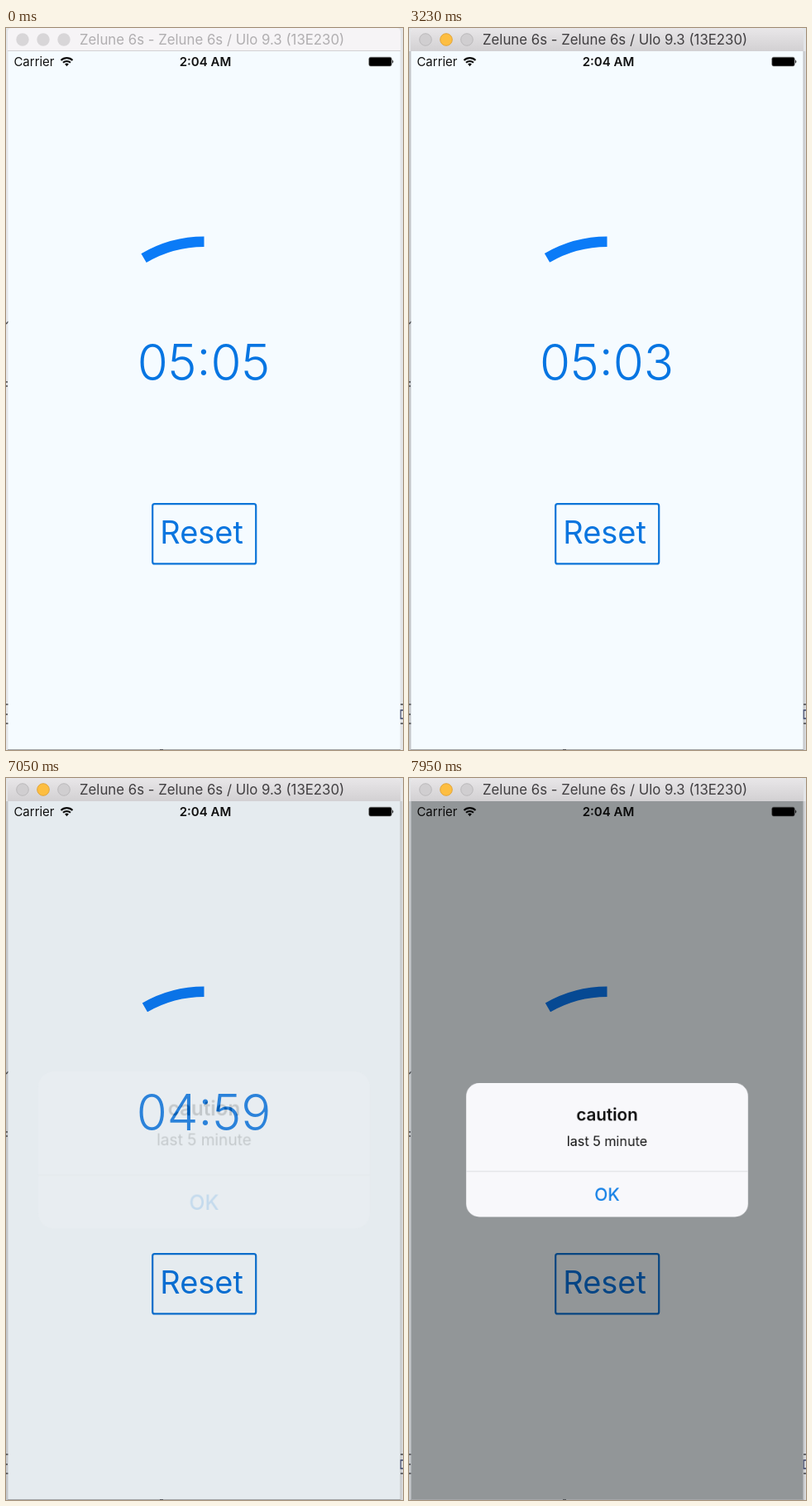
Animation of 480x871 px, one loop 8000 ms. Source, as an HTML page:

```html
<!DOCTYPE html>
<html lang="en">
<head>
<meta charset="utf-8">
<title>Countdown timer</title>
<style>
  html, body { margin: 0; width: 100%; height: 100%; overflow: hidden; background: #eceef0; }
  svg { display: block; }
  text { font-family: Inter, Roboto, sans-serif; }
  .stage { width: 100vw; height: 100vh; }
  .mid { text-anchor: middle; }

  .focused, .dim, .alert, .arc, .reel { animation: 8s linear infinite; }
  .focused { animation-name: focus; animation-timing-function: step-end; }
  .arc { animation-name: shrink; }
  .reel { animation-name: count; }
  .dim { animation-name: appear; }
  .alert { animation-name: present; transform-origin: 239.5px 448.5px; }

  @keyframes focus {
    0% { opacity: 0; }
    12.5%, 100% { opacity: 1; }
  }
  /* one tick per second, the first at 1.94 s */
  @keyframes shrink {
    0% { stroke-dasharray: 30.5 90; }
    11.75% { stroke-dasharray: 30.5 90; animation-timing-function: steps(6, end); }
    86.75%, 100% { stroke-dasharray: 29.9 90; }
  }
  @keyframes count {
    0% { transform: translateY(0); }
    11.75% { transform: translateY(0); animation-timing-function: steps(6, end); }
    86.75%, 100% { transform: translateY(-600px); }
  }
  /* the alert opens over 400 ms on the last tick */
  @keyframes appear {
    0% { opacity: 0; }
    86.75% { opacity: 0; animation-timing-function: ease-in-out; }
    91.75%, 100% { opacity: 1; }
  }
  @keyframes present {
    0% { opacity: 0; transform: scale(1.21); }
    86.75% { opacity: 0; transform: scale(1.21); animation-timing-function: ease-in-out; }
    91.75%, 100% { opacity: 1; transform: scale(1); }
  }
</style>
</head>
<body>
<svg class="stage" viewBox="0 0 480 871">
  <defs>
    <linearGradient id="bar" x2="0" y2="1">
      <stop stop-color="#e9e7e9"/>
      <stop offset="1" stop-color="#d2d0d2"/>
    </linearGradient>
    <linearGradient id="edge">
      <stop stop-color="#b9bbbe"/>
      <stop offset="1" stop-color="#dfe1e4"/>
    </linearGradient>
  </defs>

  <!-- desktop behind the window -->
  <rect width="480" height="871" fill="#e3e5e8"/>
  <g class="focused">
    <rect y="28" width="3" height="843" fill="#c3c6ca"/>
    <rect x="476" y="28" width="4" height="843" fill="url(#edge)"/>
  </g>
  <path d="M0 357l3-3M0 427h2M0 432h2M0 816h3M0 828h2M0 839h3M477 816h3M477 839h3" stroke="#44464a" stroke-width="1.5"/>
  <path d="M480 823h-3v10h3" fill="none" stroke="#3c4468" stroke-width="1.5"/>

  <!-- title bar -->
  <path d="M2 28V5q0-5 5-5H472q5 0 5 5V28z" fill="#f6f4f6"/>
  <g fill="#d8d6d8">
    <circle cx="20" cy="14" r="7.7"/>
    <circle cx="45" cy="14" r="7.7"/>
    <circle cx="70" cy="14" r="7.7"/>
  </g>
  <text x="89" y="20" font-size="16.8" fill="#b0aeb0">Zelune 6s - Zelune 6s / Ulo 9.3 (13E230)</text>
  <g class="focused">
    <path d="M2 28V5q0-5 5-5H472q5 0 5 5V28z" fill="url(#bar)"/>
    <g fill="#d0ced0" stroke="#bcbabc">
      <circle cx="20" cy="14" r="7.3"/>
      <circle cx="45" cy="14" r="7.3" fill="#fdbe41" stroke="#e2a53a"/>
      <circle cx="70" cy="14" r="7.3"/>
    </g>
    <text x="89" y="20" font-size="16.8" fill="#403e40">Zelune 6s - Zelune 6s / Ulo 9.3 (13E230)</text>
  </g>

  <!-- screen -->
  <rect x="2.5" y="28" width="474" height="842" fill="#f5fbff"/>
  <path d="M2 27.5H477" stroke="#d3d1d4"/>
  <path d="M2 870.5H477" stroke="#a4a6a9"/>
  <path d="M186 870.5h4" stroke="#55585c"/>

  <!-- status bar -->
  <text x="9.4" y="46" font-size="15" fill="#111">Carrier</text>
  <g fill="none" stroke="#111" stroke-width="2.1">
    <path d="M66.5 39a10 10 0 0 1 14 0M69 41.8a6.4 6.4 0 0 1 9 0"/>
    <path d="M73.5 46.2l-2.4-2.6a3.5 3.5 0 0 1 4.8 0z" fill="#111" stroke="none"/>
  </g>
  <text class="mid" x="241" y="46" font-size="15" font-weight="600" fill="#111">2:04 AM</text>
  <rect x="438.8" y="35.2" width="27.4" height="10.8" rx="2" fill="#000" stroke="#777" stroke-width=".6"/>
  <path d="M467.2 38.3q2.2 2.3 0 4.5z" fill="#000"/>

  <!-- timer -->
  <path class="arc" d="M239.5 257.7A143.7 143.7 0 0 0 95.8 401.4" pathLength="90" fill="none" stroke="#0b7bf7" stroke-width="12.5" stroke-dasharray="30.5 90"/>
  <svg x="100" y="360" width="280" height="90" overflow="hidden">
    <g class="reel mid" font-size="60" font-weight="300" fill="#0675e2">
      <text x="139" y="64.6">05:05</text>
      <text x="139" y="164.6">05:04</text>
      <text x="139" y="264.6">05:03</text>
      <text x="139" y="364.6">05:02</text>
      <text x="139" y="464.6">05:01</text>
      <text x="139" y="564.6">05:00</text>
      <text x="139" y="664.6">04:59</text>
    </g>
  </svg>
  <rect x="177.2" y="574.2" width="125" height="72.2" rx="2.5" fill="none" stroke="#0c74d8" stroke-width="2.2"/>
  <text class="mid" x="236.6" y="621.8" font-size="38" fill="#0a75df">Reset</text>

  <!-- alert -->
  <rect class="dim" x="2.5" y="28" width="474" height="842" fill="#000" fill-opacity=".405"/>
  <g class="alert mid">
    <rect x="69" y="368" width="341" height="161.5" rx="16" fill="#f8f8fb"/>
    <path d="M69 474.5H410" stroke="#dcdde0"/>
    <text x="239.5" y="413" font-size="20.6" font-weight="600" fill="#0c0c0c">caution</text>
    <text x="239.5" y="444" font-size="16.2" fill="#161616">last 5 minute</text>
    <text x="239.5" y="510" font-size="21" font-weight="500" fill="#1480e6">OK</text>
  </g>
</svg>
</body>
</html>
```
